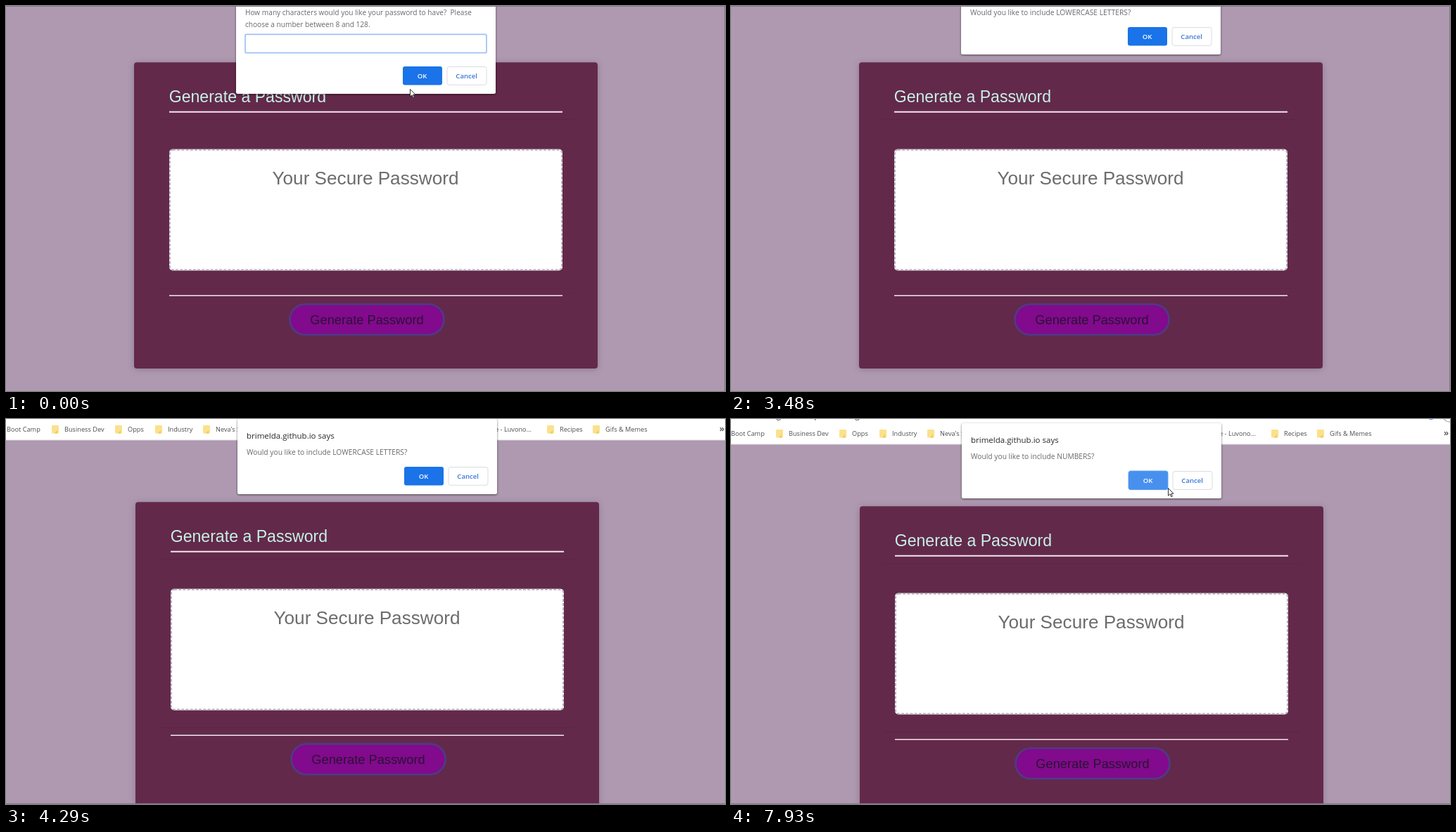
Write an HTML page that moves like this. It is 1022x548 px and loops after 8 s.

```html
<!DOCTYPE html>
<html lang="en">
<head>
<meta charset="utf-8">
<title>Password generator</title>
<style>
  html, body { margin: 0; width: 100%; height: 100%; overflow: hidden; background: #ae99b0; }
  svg { display: block; width: 1022px; height: 548px; }
  text { white-space: pre; font-family: "Open Sans", "Noto Sans", sans-serif; }
  .page text { font-family: "Liberation Sans", Arial, sans-serif; }
  .bar text { font-size: 9.2px; fill: #4b4d51; }
  .bold { font-size: 9.6px; font-weight: 600; text-anchor: middle; }
  .msg { fill: #67696d; }
  .card { filter: drop-shadow(0 1px 4px rgba(70, 45, 85, .3)); }
  .dialog { filter: drop-shadow(0 1px 1.6px rgba(0, 0, 0, .55)); }
</style>
</head>
<body>
<svg viewBox="0 0 1022 548">
  <g id="world">
    <g class="page">
      <rect class="card" x="182" y="80.3" width="659" height="435.7" rx="4" fill="#63294a"/>
      <path d="M216 161.5H808M216 401.5H808" stroke="#5c2645" fill="none"/>
      <text x="231.7" y="137" font-size="23.1" fill="#c6f1e7">Generate a Password</text>
      <path d="M232 150.7H791" stroke="#f1e7ee" stroke-width="2"/>
      <rect x="232" y="203.8" width="559" height="172.6" rx="5" fill="#fff"/>
      <rect x="233" y="204.8" width="557" height="170.6" rx="4" fill="none"
        stroke="#b9b2bf" stroke-width="2" stroke-dasharray="4 2.2"/>
      <text x="511" y="254" font-size="26.15" fill="#6c6c6c" text-anchor="middle">Your Secure Password</text>
      <path d="M232 412.2H791" stroke="#f1e7ee" stroke-width="1.6"/>
      <rect x="403.5" y="424.5" width="219" height="43.5" rx="21.75" fill="#820a8c" stroke="#4d3b85" stroke-width="2.6"/>
      <text x="513" y="453.3" font-size="18.25" fill="#2b1236" text-anchor="middle">Generate Password</text>
    </g>
    <g class="bar" id="bar">
      <path d="M-10 -130H1040V-8H-10Z" fill="#fff"/>
      <path d="M-10 -8H1040" stroke="#dcd6dd"/>
      <circle cx="994" cy="-50" r="7" fill="#4a90e2"/>
      <circle cx="1020" cy="-49" r="9" fill="none" stroke="#b5b7ba" stroke-width="1.4"/>
      <text x="10" y="-45.5" style="font-size:12px">brimelda.github.io/password-generator/</text>
      <text x="745" y="-20.3" text-anchor="end">Schedule - Luvono...</text>
      <text x="1012" y="-20" style="font-size:13px;font-weight:600">»</text>
    </g>
    <g id="dialog">
      <rect id="panel" class="dialog" x="327" y="-38" width="369" rx="2.5" fill="#fff"/>
      <text x="340" y="-10.5" font-size="11.5" fill="#26282b">brimelda.github.io says</text>
      <text id="message" class="msg" x="340" y="13" font-size="10.26"></text>
      <g id="prompt">
        <text class="msg" x="340" y="13" font-size="10.12">How many characters would you like your password to have?  Please</text>
        <text class="msg" x="340" y="29.7" font-size="10.12">choose a number between 8 and 128.</text>
        <rect id="field" x="340" y="40.3" width="343" height="26.4" rx="2" fill="#fff"/>
        <text id="typed" x="346" y="57" font-size="10" fill="#3a3c40">9</text>
        <path id="caret" d="M.5 47V59" stroke="#333"/>
      </g>
      <g id="buttons">
        <rect id="ok" x="564" y="30" width="56" height="26.6" rx="3"/>
        <text class="bold" x="591.5" y="46.8" fill="#fff">OK</text>
        <rect x="627" y="30.5" width="56" height="25.8" rx="3" fill="#fff" stroke="#dadce0"/>
        <text class="bold" x="654.7" y="46.8" fill="#3a78d6">Cancel</text>
      </g>
    </g>
  </g>
  <path id="edge" fill="none" stroke="#85788a"/>
  <g id="cursor" stroke="#1c1c1c" stroke-width=".9" fill="#fff" stroke-linejoin="round">
    <path id="arrow" d="M.5.5V11.2L3 8.8 4.8 12.7 6.4 12 4.7 8.2H8Z"/>
    <path id="hand" d="M3 1.6Q4 -.2 5 1.6V5.2L8.6 6Q10 6.4 9.7 8.5L8.7 12.5V15.5H3.6V13.8L.5 9.6Q.4 7.9 1.8 8.4L3 9.8Z"/>
  </g>
</svg>
<script>
const LOOP = 8000;
const el = id => document.getElementById(id);
const svg = (name, attrs, parent) => {
  const node = document.createElementNS("http://www.w3.org/2000/svg", name);
  for (const key in attrs) node.setAttribute(key, attrs[key]);
  return parent.appendChild(node);
};
const show = (id, on) => el(id).setAttribute("display", on ? "inline" : "none");
const move = (id, x, y) => el(id).setAttribute("transform", `translate(${x} ${y})`);

// Bookmarks: label and its left edge
[["Boot Camp", -1], ["Business Dev", 81], ["Opps", 171], ["Industry", 228],
 ["Neva's Stuff", 296], ["Recipes", 785], ["Gifs & Memes", 850]].forEach(([label, x]) => {
  svg("text", { x, y: -20.3 }, el("bar")).textContent = label;
  if (x < 0) return;
  svg("rect", { x: x - 18, y: -29, width: 10, height: 11.5, rx: 1, fill: "#fbe18c" }, el("bar"));
  svg("path", { d: `M${x - 10} -22v4.5h-4z`, fill: "#efc75e" }, el("bar"));
});

// Every table row starts with its time in ms
const scroll = [[0, 0, 0], [3620, 1, 14], [3740, 2, 34], [3870, 2, 36], [4290, 2, 38], [4410, 1, 42], [4540, 1, 44]];
const dialogs = [
  [0, "", 0], [1620, "", -1.5], [1740, "LOWERCASE LETTERS", -2], [1860, "LOWERCASE LETTERS", 0],
  [5540, "LOWERCASE LETTERS", -3], [5660, "UPPERCASE LETTERS", -3], [5930, "UPPERCASE LETTERS", -1],
  [6060, "UPPERCASE LETTERS", 0], [6900, "UPPERCASE LETTERS", -3], [7020, "NUMBERS", -3], [7140, "NUMBERS", 0]
];
const okStyles = [
  [0, "#1a73e8", "none"], [1860, "#1a73e8", "#7fb0f3"], [3480, "#1a73e8", "none"],
  [4410, "#428bee", "none"], [7140, "#4890ee", "#5e9ff0"]
];
const typing = [[0, 0, 0], [520, 0, 346], [670, 1, 352], [1080, 1, 0]];
const pointer = [
  [0, "arrow", 574, 118], [120, "arrow", 577, 114], [520, "none"], [820, "arrow", 577, 115],
  [940, "arrow", 584, 130], [1080, "arrow", 602, 105], [1200, "hand", 594, 85], [1350, "hand", 590, 97],
  [1500, "hand", 587, 100], [2140, "arrow", 587, 71], [2280, "arrow", 572, 54], [2410, "arrow", 548, 26],
  [2530, "arrow", 539, 31], [2950, "arrow", 543, 6], [3080, "none"], [4410, "arrow", 579, 96],
  [4680, "arrow", 578, 89], [4840, "hand", 579, 83], [5090, "arrow", 580.5, 83], [5810, "arrow", 580, 89],
  [6200, "arrow", 588, 89], [6350, "arrow", 593, 89], [6470, "arrow", 594.5, 89], [7930, "arrow", 621, 98]
];
const at = (table, t) => table.findLast(row => row[0] <= t).slice(1);

function draw(t) {
  const [sx, sy] = at(scroll, t);
  move("world", sx, sy);
  el("edge").setAttribute("d", sy ? "M0 547.5H1022" : "M0 .5H1021.5V548");

  const [topic, lift] = at(dialogs, t);
  const grow = topic ? 0 : 56;
  move("dialog", 0, lift);
  el("panel").setAttribute("height", 107 + grow);
  move("buttons", 0, grow);
  show("prompt", !topic);
  el("message").textContent = topic && `Would you like to include ${topic}?`;

  const focused = lift === 0;
  el("field").setAttribute("stroke", focused ? "#9fc1f4" : "#e4e6ea");
  el("field").setAttribute("stroke-width", focused ? 1.7 : 1);
  const [typed, caretX] = at(typing, t);
  show("typed", typed);
  show("caret", caretX);
  move("caret", caretX, 0);

  const [fill, ring] = at(okStyles, t);
  el("ok").setAttribute("fill", fill);
  el("ok").setAttribute("stroke", focused ? ring : "none");

  const [shape, x, y] = at(pointer, t);
  show("arrow", shape === "arrow");
  show("hand", shape === "hand");
  if (shape !== "none") move("cursor", x, y);
}

const start = performance.now();
function tick() {
  draw((performance.now() - start) % LOOP);
  requestAnimationFrame(tick);
}
tick();
</script>
</body>
</html>
```
